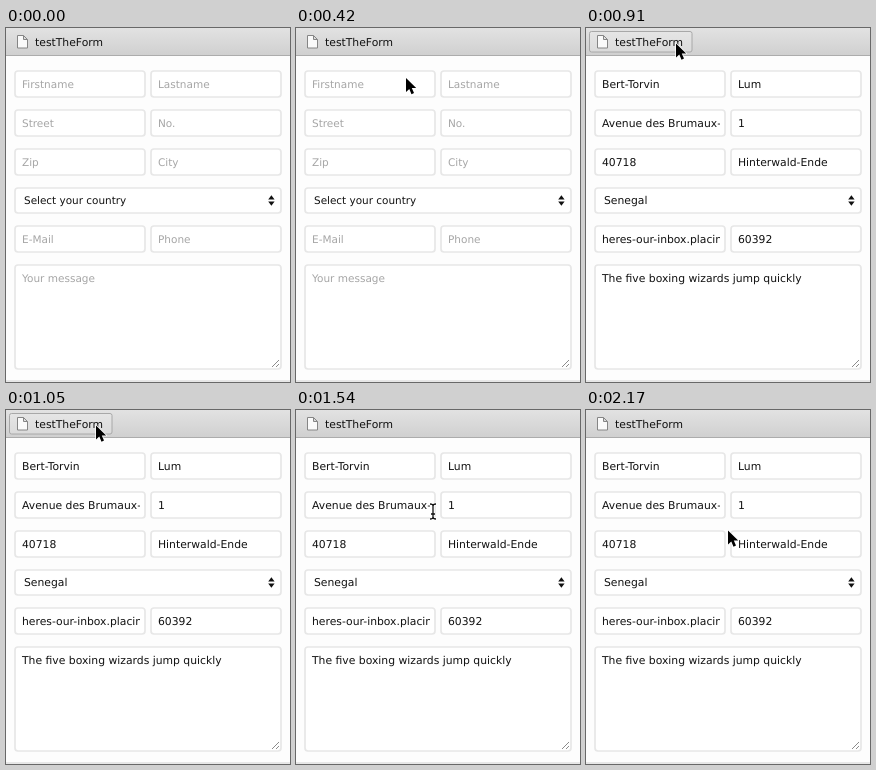
These frames come from a looping animation (284 px wide and 354 px high, 2.24 s). An HTML page:

```html
<!DOCTYPE html>
<html lang="en">
<head>
<meta charset="utf-8">
<title>testTheForm</title>
<style>
  html, body { margin: 0; width: 100%; height: 100%; overflow: hidden; background: #fdfdfd; }
  #stage { display: block; width: 284px; height: 354px; }
  text { font: 10.8px "DejaVu Sans", sans-serif; fill: #111; text-rendering: geometricPrecision; white-space: pre; }
  .hint { font-size: 10.5px; fill: #a6a6a6; }
  .pick { font-size: 10.45px; }
  .box { fill: #fff; stroke: #e7e7e7; stroke-width: 1.7; }
</style>
</head>
<body>
<svg id="stage" viewBox="0 0 284 354">
  <defs>
    <linearGradient id="bar" x2="0" y2="1">
      <stop stop-color="#e2e2e2"/>
      <stop offset="1" stop-color="#d0d0d0"/>
    </linearGradient>
  </defs>
  <rect width="284" height="354" fill="#fdfdfd"/>
  <rect width="284" height="27" fill="url(#bar)"/>
  <rect y="27" width="284" height="1" fill="#acacac"/>
  <rect y="352.5" width="284" height="1" fill="#d2d2d2"/>
  <rect id="hover" x="3.5" y="3.5" width="102.5" height="20.5" rx="2" fill="#fff" fill-opacity=".18" stroke="#a8a8a8"/>
  <path d="M11.5 7.5h6l4 4v8.500h-10z M17.500 7.500v4h4" fill="#fafafa" stroke="#858585"/>
  <text x="29" y="18">testTheForm</text>

  <g id="form"></g>

  <path d="M262.200 171.500l3.200-4.200 3.200 4.200z M262.200 173.500l3.200 4.200 3.200-4.200z" fill="#111"/>
  <path d="M266 339l7-7M270 339l3-3" stroke="#8c8c8c" fill="none"/>

  <g id="cursor">
    <path id="arrow" d="M0 0V14L3.300 11 5.500 16.200 8 15.100 5.800 10.100H10.200Z"
      fill="#000" stroke="#fff" stroke-width="1.500" paint-order="stroke" stroke-linejoin="round"/>
    <g id="beam" fill="none">
      <path d="M-3-7Q0-7 0-5Q0-7 3-7M0-5V6M-3 8Q0 8 0 6Q0 8 3 8M-2 3H2" stroke="#fff" stroke-width="3"/>
      <path d="M-3-7Q0-7 0-5Q0-7 3-7M0-5V6M-3 8Q0 8 0 6Q0 8 3 8M-2 3H2" stroke="#111" stroke-width="1.300"/>
    </g>
  </g>
</svg>
<script>
const LOOP = 2240, TICK = 70, FILLED = 910;
const $ = id => document.getElementById(id);

// x, y, width, height, placeholder, value
const fields = [
  [9, 43, 130, 26, "Firstname", "Bert-Torvin"],
  [145, 43, 130, 26, "Lastname", "Lum"],
  [9, 82, 130, 26, "Street", "Avenue des Brumaux-Lointains"],
  [145, 82, 130, 26, "No.", "1"],
  [9, 121, 130, 26, "Zip", "40718"],
  [145, 121, 130, 26, "City", "Hinterwald-Ende"],
  [9, 160, 266, 25, "Select your country", "Senegal"],
  [9, 198, 130, 26, "E-Mail", "heres-our-inbox.placing"],
  [145, 198, 130, 26, "Phone", "60392"],
  [9, 237, 266, 104, "Your message", "The five boxing wizards jump quickly"]
];

// time, x, y of the pointer
const path = [
  [70, 148, 125], [210, 148, 125], [280, 142, 108], [350, 126, 77], [420, 110, 50],
  [490, 101, 36], [560, 95, 26], [630, 91, 19], [700, 90, 15.500], [1050, 90, 15.500],
  [1120, 92, 20], [1190, 99, 29], [1260, 110, 41.500], [1330, 120, 58], [1400, 129, 79],
  [1470, 134, 93], [1540, 137, 101], [1890, 142, 120.500], [LOOP, 142, 120.500]
];

function add(parent, tag, attrs, text = "") {
  const el = document.createElementNS("http://www.w3.org/2000/svg", tag);
  for (const key in attrs) el.setAttribute(key, attrs[key]);
  el.textContent = text;
  return parent.appendChild(el);
}

const labels = fields.map(([x, y, width, height, hint, value]) => {
  const isPick = hint.startsWith("Select");
  add($("form"), "rect", { x, y, width, height, rx: 3, class: "box" });
  const clip = add($("form"), "svg", { x: x + 6, y, width: width - 11, height });
  const label = add(clip, "text", { x: isPick ? 3 : 1, y: isPick ? 16 : 17 });
  return { label, hint, value, hintClass: isPick ? "pick" : "hint" };
});

function pointer(t) {
  const i = Math.max(1, path.findIndex(p => p[0] >= t));
  const [t0, x0, y0] = path[i - 1], [t1, x1, y1] = path[i];
  const k = Math.max(0, (t - t0) / (t1 - t0));
  return [x0 + (x1 - x0) * k, y0 + (y1 - y0) * k];
}

const show = (el, on) => el.setAttribute("visibility", on ? "visible" : "hidden");
let filledNow = null;

function draw(time) {
  const t = Math.floor((time % LOOP) / TICK) * TICK;
  const filled = t >= FILLED;
  if (filled !== filledNow) {
    for (const { label, hint, value, hintClass } of labels) {
      label.textContent = filled ? value : hint;
      label.setAttribute("class", filled ? "" : hintClass);
    }
    filledNow = filled;
  }
  const [x, y] = pointer(t);
  const visible = t >= 70, beam = t >= 1400 && t < 1750;
  $("cursor").setAttribute("transform", `translate(${x} ${y})`);
  show($("arrow"), visible && !beam);
  show($("beam"), beam);
  show($("hover"), visible && y < 24);
}

const start = performance.now();
function frame() {
  draw(performance.now() - start);
  requestAnimationFrame(frame);
}
frame();
</script>
</body>
</html>
```
